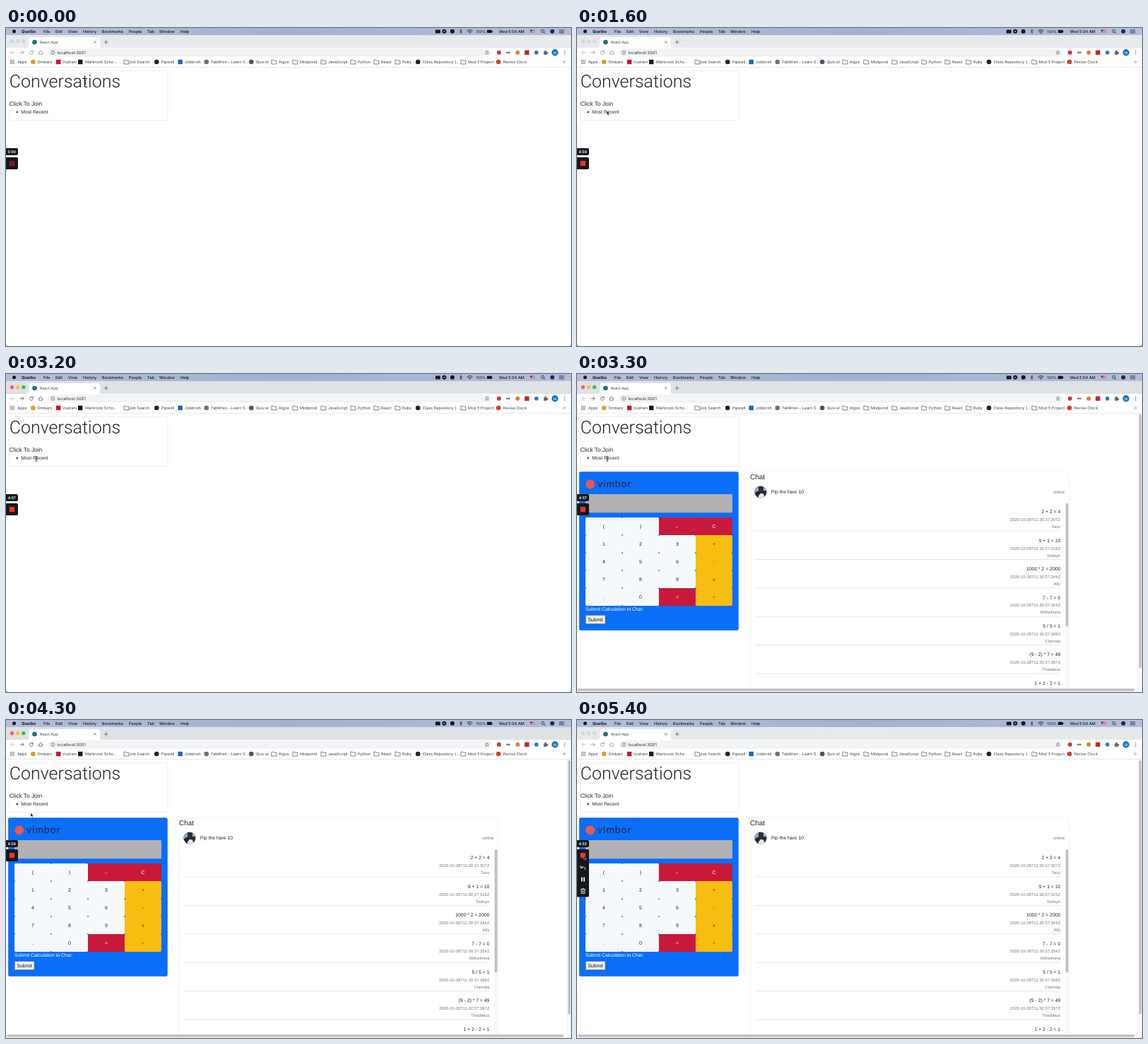
Write an HTML page that moves like this. It is 800x450 px and loops after 5500 ms.

```html
<!DOCTYPE html>
<html lang="en">
<head>
<meta charset="utf-8">
<title>Chat calculator</title>
<style>
  html, body { margin: 0; width: 100%; height: 100%; overflow: hidden; background: #fff; }
  svg { display: block; width: 800px; height: 450px; text-rendering: geometricPrecision; }
  text { white-space: pre; }
  .ui { font-family: Inter, sans-serif; }
  .page { font-family: "Liberation Sans", Arial, sans-serif; }
  .line { fill: none; stroke-linecap: round; stroke-linejoin: round; }
</style>
</head>
<body>
<svg id="stage" viewBox="0 0 800 450"></svg>
<script>
const LOOP = 5500, STEP = 100;
const INK = '#212529', GREY = '#5f6368';

const rect = (x, y, w, h, fill, more = '') =>
  `<rect x="${x}" y="${y}" width="${w}" height="${h}" fill="${fill}" ${more}/>`;
const dot = (x, y, r, fill, more = '') =>
  `<circle cx="${x}" cy="${y}" r="${r}" fill="${fill}" ${more}/>`;
const line = (d, color = GREY, width = 0.8, more = '') =>
  `<path class="line" d="${d}" stroke="${color}" stroke-width="${width}" ${more}/>`;
// y is the middle of the capitals
const text = (x, y, str, size, fill = INK, more = '') =>
  `<text x="${x}" y="${y + size * 0.36}" font-size="${size}" fill="${fill}" ${more}>${str}</text>`;
const group = (id, body, more = '') => `<g id="${id}" ${more}>${body}</g>`;
const END = 'text-anchor="end"', MID = 'text-anchor="middle"';

function menuBar() {
  const items = [[53, 'File'], [70, 'Edit'], [88, 'View'], [109, 'History'], [136, 'Bookmarks'],
    [174, 'People'], [200, 'Tab'], [217, 'Window'], [247, 'Help']];
  const black = '#15171c';
  return rect(0, 0, 800, 10, 'url(#sky)') +
    dot(11.5, 4.8, 2.5, black) +
    text(22, 4.8, 'Quelbo', 5.8, black, 'font-weight="700"') +
    items.map(([x, s]) => text(x, 4.8, s, 5.6, black, 'font-weight="500"')).join('') +
    rect(608, 2.4, 7, 5, black, 'rx="1.2"') + dot(620.5, 4.8, 3, black) +
    dot(620.5, 4.8, 1, '#aab6d2') + dot(632, 4.8, 3, black) +
    line('M642.5 3.4 645.5 6.2 644 7.6V2L645.5 3.4 642.5 6.2', black, 0.6) +
    line('M653 3.9Q656.7 1 660.4 3.9M654.4 5.5Q656.7 3.7 659 5.5', black, 0.9) + dot(656.7, 7, 0.8, black) +
    text(665.5, 4.8, '100%', 5.1, black) +
    rect(681, 2.7, 7, 4.4, black, 'rx="1"') + rect(688.4, 4, 0.8, 1.8, black) +
    text(698, 4.8, 'Wed 5:04 AM', 5.5, black, 'font-weight="500"') +
    rect(742, 2.5, 7, 4.8, '#f3dfe2') +
    [2.5, 4.2, 5.9].map(y => rect(742, y, 7, 0.9, '#c8414c')).join('') + rect(742, 2.5, 3, 2.4, '#3b4d91') +
    dot(760, 4.3, 2, 'none', `stroke="${black}" stroke-width=".7"`) + line('M761.5 5.8 763.2 7.5', black, 0.8) +
    dot(773.5, 4.8, 3, '#1c2850') +
    line('M783.5 2.8H790M783.5 4.8H790M783.5 6.8H790', black, 0.7);
}

function bookmarks() {
  const folder = x => `<path d="M${x} 45.2h2.5l.8 1h3.7v4.8h-7z" fill="none" stroke="${GREY}" stroke-width=".8"/>`;
  const round = color => x => dot(x + 3.3, 48, 3.3, color);
  const square = color => x => rect(x, 44.8, 6.4, 6.4, color);
  const apps = x => [0, 1, 2, 3, 4, 5, 6, 7, 8].map(i =>
    rect(x + i % 3 * 2.2, 45 + Math.floor(i / 3) * 2.2, 1.5, 1.5, ['#e05a4f', '#5b8def', '#5aa469'][i % 3])).join('');
  return [
    [6, 16, 'Apps', apps], [35, 44.5, 'Ombaro', round('#e8992c')], [71, 80, 'Vudrani', square('#c7162b')],
    [102, 112, 'Marbrook Scho...', square('#17191c')], [167, 174, 'Job Search', folder],
    [210, 220, 'Pipwell', round('#202328')], [243.5, 253, 'Jobbrish', square('#1767b3')],
    [280.5, 290, 'TabWren - Learn S...', round('#6d7278')], [344, 354, 'Quiv.el', round('#4b5563')],
    [376, 386, 'Algos', folder], [406, 416, 'Mistpond', folder], [446, 456, 'JavaScript', folder],
    [488, 498, 'Python', folder], [521, 531, 'React', folder], [551, 561, 'Ruby', folder],
    [580, 590, 'Class Repository (...', round('#202328')], [644, 654, 'Mod 5 Project', folder],
    [694, 704, 'Revise Clock', round('#d93a20')]
  ].map(([ix, x, label, icon]) => icon(ix) + text(x, 48, label, 5.5, '#3c4043')).join('') +
    line('M789 46.5 790.3 48 789 49.5M791 46.5 792.3 48 791 49.5', GREY, 0.6);
}

function browser() {
  return rect(0, 10, 800, 18, '#dee1e6', 'id="strip"') +
    [8.5, 16.7, 24.8].map(x => dot(x, 18.7, 2.6, '#dcdcde', 'class="light"')).join('') +
    `<path d="M30 28Q32.5 28 32.5 25V16Q32.5 13 35.5 13H130Q133 13 133 16V25Q133 28 135.5 28Z" fill="#fff"/>` +
    dot(40.5, 20, 3.3, '#20707c') +
    text(48, 20, 'React App', 5.2, '#3c4043') +
    line('M124.3 18.5 127.3 21.5M127.3 18.5 124.3 21.5', GREY, 0.7) +
    line('M139.2 20H144.2M141.7 17.5V22.5', GREY, 0.8) +
    rect(0, 28, 800, 28, '#fff') +
    line('M12 34.7H7M9.3 32.3 7 34.7 9.3 37.1', '#b8bbbf') +
    group('nav', line('M20 34.7H25M22.7 32.3 25 34.7 22.7 37.1M38 33.3A2.5 2.5 0 1 0 38.4 35.3M38.3 32V33.7H36.6', 'currentColor') +
      line('M46 34.8 49 32 52 34.8M46.8 34.4V37.2H51.2V34.4', 'currentColor')) +
    rect(59, 29, 629, 11.5, '#f1f3f4', 'rx="5.7"') +
    dot(66.3, 34.7, 2.6, 'none', `stroke="${GREY}" stroke-width=".7"`) + line('M66.3 34.4V36.1M66.3 33.2V33.3', GREY, 0.7) +
    text(72.5, 34.7, 'localhost:3001', 5.9, '#2b2e32') +
    line('M681 32 681.8 33.9 683.8 34 682.2 35.3 682.8 37.3 681 36.1 679.2 37.3 679.8 35.3 678.2 34 680.2 33.9Z', GREY, 0.6) +
    dot(698, 34.7, 3, '#d8303c') + dot(709.7, 34.7, 1.3, GREY) + dot(712.5, 34.7, 1.3, GREY) +
    dot(724.5, 34.7, 3, '#d9822f') + rect(734.3, 31.5, 6.4, 6.4, '#bf2532') +
    dot(751, 34.7, 2.8, '#2376d2') +
    rect(761.4, 33.2, 4.6, 4.5, GREY, 'rx=".5"') + dot(763.8, 32.7, 1.2, GREY) + dot(766.4, 35.3, 1.2, GREY) +
    dot(777.3, 34.8, 4.7, '#1478c4') + text(777.3, 34.8, 'M', 4.8, '#fff', MID) +
    [32.4, 34.7, 37].map(y => dot(791, y, 0.7, GREY)).join('') +
    bookmarks() + rect(0, 55, 800, 0.7, '#dcdee1');
}

function conversations() {
  return rect(4.5, 60.5, 224.5, 70, '#fff', 'rx="1.5" stroke="#e2e5e9" stroke-width=".7"') +
    text(4.7, 75.3, 'Conversations', 25, INK, 'font-family="Roboto, sans-serif" font-weight="300"') +
    text(4.7, 106.7, 'Click To Join', 8.3) +
    dot(15.8, 119, 1.2, INK) + text(21.3, 119, 'Most Recent', 6.8);
}

function calculator() {
  const colors = { w: '#f6f9fc', r: '#c8193a', y: '#f8bd11' };
  const rows = [['( ) ← C', 'wwrr'], ['1 2 3 +', 'wwwy'], ['4 5 6 -', 'wwwy'], ['7 8 9 x', 'wwwy'], ['. 0 = ÷', 'wwry']];
  const keys = rows.flatMap(([labels, kinds], r) => labels.split(' ').map((label, c) => {
    const x = 12 + c * 52, y = 203 + r * 25, kind = kinds[c];
    const ink = kind === 'r' ? '#fff' : kind === 'y' ? '#5b4915' : INK;
    return rect(x, y, 52, 25, colors[kind], 'rx="1.7"') + text(x + 26, y + 12.5, label, 7, ink, MID);
  }));
  return rect(3.3, 138.5, 225.2, 224, '#0a6ef8', 'rx="2" stroke="#0b5fd4" stroke-width=".5"') +
    dot(18.7, 156, 6.5, '#e9574e') +
    text(29, 155.3, 'vimbor', 14, '#28263a', 'font-family="Lato, sans-serif" letter-spacing=".9"') +
    rect(12, 170, 208, 26.3, '#b1b1b3', 'rx="1.5"') + keys.join('') +
    text(12, 333, 'Submit Calculation to Chat:', 6.8, '#fff') +
    rect(12.3, 341.5, 27.7, 12, '#efefef', 'stroke="#777" stroke-width=".6"') +
    text(26.1, 347.6, 'Submit', 6.8, '#111', MID);
}

function chat() {
  const messages = [['2 + 2 = 4', '307', 'Tavo'], ['9 + 1 = 10', '315', 'Selwyn'], ['1000 * 2 = 2000', '344', 'Alfy'],
    ['7 - 7 = 0', '354', 'Wilhelmina'], ['5 / 5 = 1', '369', 'Clarinda'], ['(9 - 2) * 7 = 49', '397', 'Thaddeus'],
    ['1 + 2 - 2 = 1', '412', 'Osbert']];
  const list = messages.map(([sum, ms, name], i) => {
    const y = 195 + i * 40.4;
    return text(684.5, y, sum, 6.8, INK, END) +
      text(684.5, y + 11, `2020-10-28T11:30:37.${ms}Z`, 5.9, '#72777c', END) +
      text(684.5, y + 21, name, 5.9, '#72777c', END) +
      rect(252, y + 26.6, 432.5, 0.7, '#d9dce0');
  }).join('');
  return rect(245, 138.5, 452, 330, '#fff', 'rx="2" stroke="#eceef0" stroke-width=".6"') +
    text(245, 145, 'Chat', 10) +
    `<g clip-path="url(#face)">${rect(250, 157, 20, 20, '#2b2f38') + rect(250, 157, 7, 11, '#8fa9c4') +
      rect(264, 157, 6, 8, '#a7b4c2') + dot(261, 173, 4, '#e8e6e4') + dot(256, 169, 3, '#20232a')}</g>` +
    text(275, 166.7, 'Pip the hare 10', 6.8) +
    text(690.5, 166.7, 'online', 6, '#72777c', END) +
    list + rect(691, 182, 5.5, 262, '#f7f7f7') + rect(692, 183, 3.7, 174.5, '#c1c1c1', 'rx="1.8"');
}

function scrollbars() {
  return rect(794.5, 56, 5.5, 394, '#f9f9f9', 'stroke="#e8e8e8" stroke-width=".4"') +
    rect(795.8, 57, 3.4, 359.5, '#c1c1c1', 'rx="1.7"') +
    rect(0, 444, 800, 6, '#f9f9f9', 'stroke="#e8e8e8" stroke-width=".4"') +
    rect(1, 445.3, 788.5, 3.5, '#c1c1c1', 'rx="1.7"');
}

function recorder() {
  const black = '#17181b', white = '#f2f2f2';
  const panel = (y, h) => `<path d="M0 ${y}H15Q17 ${y} 17 ${y + 2}V${y + h - 2}Q17 ${y + h} 15 ${y + h}H0Z" fill="${black}"/>`;
  return panel(170, 10) + text(8.2, 175, '', 5, '#fff', `id="timer" ${MID} font-weight="700"`) + panel(183, 17) +
    group('tools', panel(183, 67.5) +
      line('M5.2 206.5V209.3H8M5.4 209A3.8 3.8 0 0 1 12 211.5', white, 0.9) +
      rect(6, 222.5, 1.8, 6, white) + rect(9.2, 222.5, 1.8, 6, white) +
      line('M5.3 239.7H11.7M7.4 239.5V238.4H9.6V239.5M6 240V245.5H11V240M7.7 241.5V244M9.3 241.5V244', white, 0.8)) +
    rect(4.8, 188, 7.2, 7.2, '#ee3524', 'id="stop" rx=".8"') +
    group('hatch', line('M5.5 190.4H11.5M5.5 192.8H11.5M7.3 188.5V194.5M9.7 188.5V194.5', black, 0.5));
}

const cursors =
  group('arrow', '<path d="M0 0V7.2L1.7 5.7 2.9 8.3 4.2 7.7 3 5.2H5.2Z" fill="#111" stroke="#fff" stroke-width=".5"/>') +
  group('beam', line('M-1.2-3.5Q0-3.5 0-2.7Q0-3.5 1.2-3.5M0-2.7V2.7M-1.2 3.5Q0 3.5 0 2.7Q0 3.5 1.2 3.5M-.7 .9H.7', '#222', 0.7));

document.getElementById('stage').innerHTML =
  `<defs><linearGradient id="sky"><stop stop-color="#b3bfd9"/><stop offset=".5" stop-color="#a3b1cf"/>
    <stop offset="1" stop-color="#b2bedb"/></linearGradient>
    <clipPath id="face"><circle cx="260" cy="167" r="8.6"/></clipPath></defs>` +
  rect(0, 0, 800, 450, '#30323a') + rect(0, 10, 800, 440, '#fff', 'rx="2"') +
  group('page', conversations() + group('room', calculator() + chat() + scrollbars()), 'class="page"') +
  group('frame', menuBar() + browser() + recorder(), 'class="ui"') + cursors;

const $ = id => document.getElementById(id);
const show = (id, on) => $(id).setAttribute('visibility', on ? 'visible' : 'hidden');
const lights = [...document.querySelectorAll('.light')];

// time, x, y of the pointer
const path = [[0, 112.5, 76.5], [100, 112.5, 76.5], [700, 37, 108.5], [1200, 37, 108.5], [1700, 43, 118.5],
  [3400, 43, 118.5], [4000, 35, 131.5], [4400, 35, 131.5], [5100, 9.5, 192], [LOOP, 9.5, 192]];

function pointerAt(t) {
  const i = path.findIndex(p => p[0] > t);
  const [t0, x0, y0] = path[i - 1], [t1, x1, y1] = path[i];
  const u = (t - t0) / (t1 - t0), e = u * u * (3 - 2 * u);
  return [x0 + (x1 - x0) * e, y0 + (y1 - y0) * e];
}

function draw(now) {
  const t = Math.floor(now % LOOP / STEP) * STEP;
  const active = t >= 2200 && t < 5300;
  lights.forEach((el, i) => el.setAttribute('fill', active ? ['#fc5b57', '#fdbc2e', '#29c940'][i] : '#d6d7da'));
  $('strip').setAttribute('fill', active ? '#dee1e6' : '#e7eaed');
  $('nav').setAttribute('color', active ? '#55595e' : '#909499');

  const left = 300 - Math.floor((t + 400) / 1000);
  $('timer').textContent = `${Math.floor(left / 60)}:${String(left % 60).padStart(2, '0')}`;
  $('stop').setAttribute('fill', t < 100 ? '#a3202c' : '#ee3524');
  show('hatch', t < 100);
  show('room', t >= 3300);
  show('tools', t >= 5000);

  const beam = t < 200 || (t >= 2400 && t < 3500);
  const [x, y] = pointerAt(t);
  show('beam', beam);
  show('arrow', !beam);
  $('beam').setAttribute('transform', `translate(${x} ${y + (t < 200 ? 0 : 1.5)})`);
  $('arrow').setAttribute('transform', `translate(${x} ${y}) scale(.75)`);
  requestAnimationFrame(draw);
}
requestAnimationFrame(draw);
</script>
</body>
</html>
```
